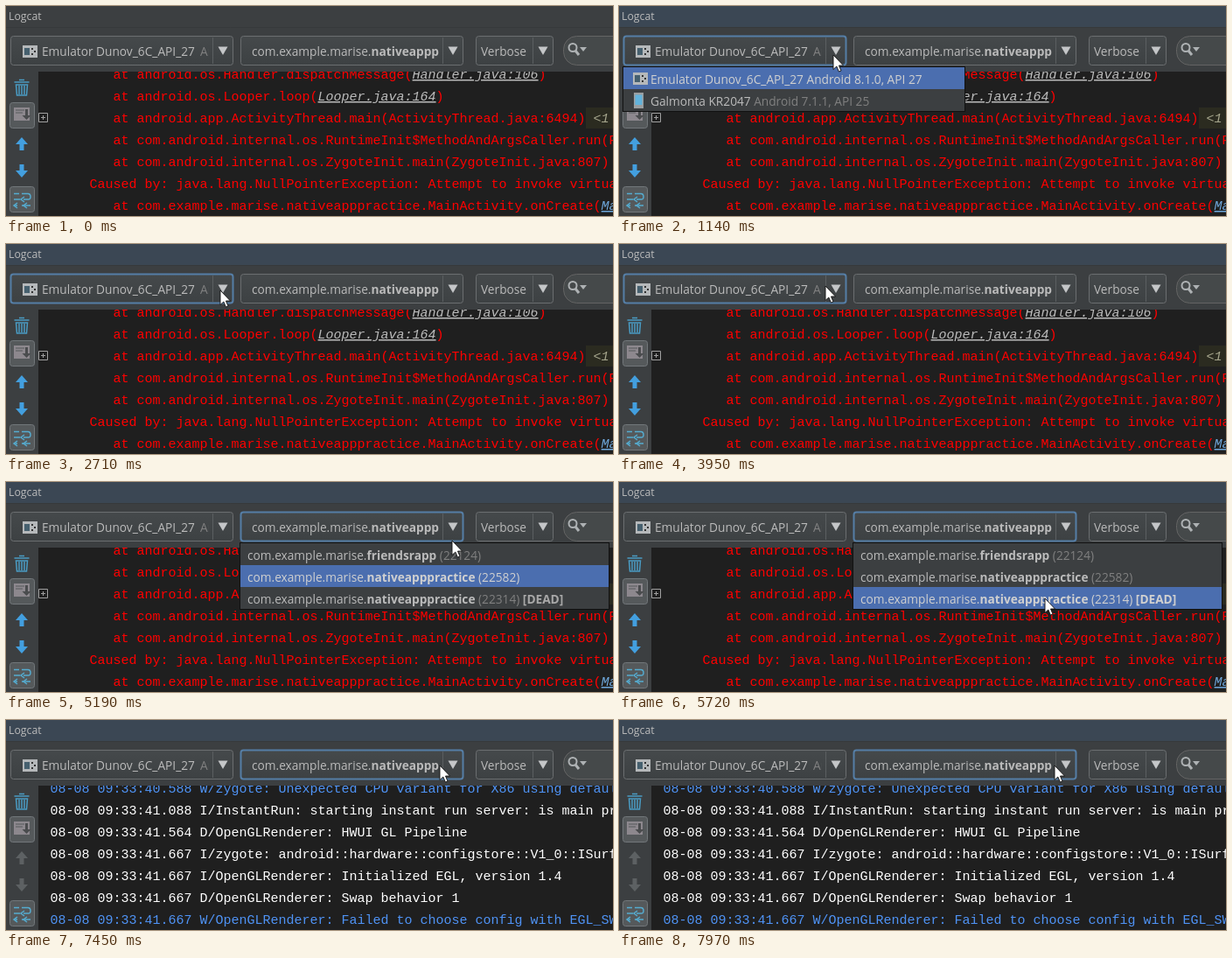
An HTML page that plays this animation: 694x240 px, repeating every 8 s.

```html
<!DOCTYPE html>
<html lang="en">
<head>
<meta charset="utf-8">
<title>Logcat</title>
<style>
  html, body { margin: 0; width: 100%; height: 100%; overflow: hidden; background: #3c3f41; }
  svg { display: block; }
  text { font: 13.7px "Open Sans", "Noto Sans", sans-serif; fill: #bbb; white-space: pre; }
  .title { font-size: 12.3px; }
  .b { font-weight: 700; }
  .dim { fill: #808080; }
  .dead { fill: #a8a8a8; font-weight: 700; }
  .on text, .on tspan { fill: #d0d0d0; }
  .log text { font: 15px "Liberation Mono", "Courier New", monospace; fill: #fff; }
  .log .error { fill: #f00; }
  .log .warn { fill: #4f93f5; }
  .log .link { fill: #bbb; font-style: italic; text-decoration: underline; }
  .log .own { fill: #6fa8dc; }
  .log .fold { fill: #a5a58c; font-style: italic; }
</style>
</head>
<body>
<svg id="stage" width="694" height="240" viewBox="0 0 694 240">
  <defs>
    <linearGradient id="face" x2="0" y2="1">
      <stop stop-color="#45494b"/><stop offset="1" stop-color="#3d4143"/>
    </linearGradient>
  </defs>

  <rect width="694" height="240" fill="#3c3f41"/>
  <rect id="header" width="694" height="24"/>
  <path d="M0 24.5H694" stroke="#36393b"/>
  <text class="title" x="3" y="16">Logcat</text>

  <!-- log area -->
  <rect x="37" y="75" width="657" height="165" fill="#1f1f1f"/>
  <svg y="75" width="694" height="165" viewBox="0 75 694 165">
    <g id="crash" class="log"></g>
    <g id="boot" class="log"></g>
  </svg>

  <!-- side buttons -->
  <g fill="#55595b" stroke="#72777a">
    <rect x="4.5" y="110.5" width="28" height="29" rx="3"/>
    <rect x="4.5" y="206.5" width="28" height="29" rx="3"/>
  </g>
  <g fill="none" stroke="#4a9cc4" stroke-width="1.5">
    <path d="M9.500 87H26.500M15 84.500H21M11.500 90L12.500 102H23.500L24.500 90Z"/>
    <path d="M15 91V101M18 91V101M21 91V101"/>
  </g>
  <path d="M9 116H27V131H9Z" fill="#8d888e"/>
  <path d="M11 119H21M11 122H19" stroke="#55595b"/>
  <path d="M22 118H25V125H28.500L23.500 130L18.500 125H22Z" fill="#4a4c4e"/>
  <g id="arrows">
    <path d="M18 150L25 158H20.500V165H15.500V158H11Z"/>
    <path d="M18 196L25 188H20.500V181H15.500V188H11Z"/>
  </g>
  <g fill="none" stroke="#55acd0" stroke-width="1.5">
    <path d="M9 214.500H15M18 214.500H25Q28 214.500 28 218T25 221H20M16 221H9M9 228H13M18 228H28"/>
    <path d="M21 218L17 221L21 224M13 225L9 228L13 231M24 225L20 228L24 231"/>
  </g>

  <!-- toolbar -->
  <g id="combos"></g>
  <g id="device">
    <path d="M19 45H36V59H19Z" fill="#b5b8ba"/>
    <path d="M21 48H27V56H21Z" fill="#46606f"/>
    <path d="M29 48H31V50H29ZM32 51H34V53H32ZM29 54H31V56H29Z" fill="#333"/>
  </g>
  <svg width="232" height="74">
    <text x="41" y="56.500">Emulator Dunov_6C_API_27</text>
    <text class="dim" x="222" y="56.500">Android</text>
  </svg>
  <text x="281" y="56.500">com.example.marise.<tspan class="b">nativeappp</tspan></text>
  <text x="543" y="56.500">Verbose</text>
  <rect x="637.5" y="34.500" width="90" height="33" rx="15" fill="#45494a" stroke="#646464"/>
  <g fill="none" stroke="#aeb2b4" stroke-width="2">
    <circle cx="648" cy="47.500" r="4.500"/><path d="M651 51L655 56" stroke-width="3"/>
    <path d="M656 47H664L660 52Z" fill="#aeb2b4" stroke="none"/>
  </g>

  <g id="devices"></g>
  <g id="processes"></g>
  <path id="cursor" d="M0 0V16.500L3.800 13L6.400 19L9 18L6.500 12H11.500Z" fill="#fff" stroke="#111" stroke-width=".9"/>
</svg>
<script>
const $ = id => document.getElementById(id);
const ROW = 25;
const text = (x, y, s, cls = '') => `<text x="${x}" y="${y}" class="${cls}">${s}</text>`;
const span = (s, cls) => `<tspan class="${cls}">${s}</tspan>`;
const show = (id, on) => $(id).setAttribute('visibility', on ? 'visible' : 'hidden');
const logLine = (indent, row, s, cls) => text(50.5 + 9 * indent, 83 + ROW * row, s, cls);

// Stack trace: a bracketed part marked with * is a link.
const trace = [
  'at android.os.Handler.dispatchMessage(*Handler.java:106*)',
  'at android.os.Looper.loop(*Looper.java:164*)',
  'at android.app.ActivityThread.main(ActivityThread.java:6494)',
  'at com.android.internal.os.RuntimeInit$MethodAndArgsCaller.run(RuntimeInit.java:438)',
  'at com.android.internal.os.ZygoteInit.main(ZygoteInit.java:807)',
  'Caused by: java.lang.NullPointerException: Attempt to invoke virtual method',
  'at com.example.marise.nativeapppractice.MainActivity.onCreate(*MainActivity.java:24*)'
];
$('crash').innerHTML = trace.map((s, i) => {
  const link = s.includes('marise') ? 'link own' : 'link';
  return logLine(s.startsWith('at') ? 8 : 5, i, s.replace(/\*(.+)\*/, (_, file) => span(file, link)), 'error');
}).join('') +
  '<rect x="663" y="116" width="31" height="24" fill="#2b2b20"/>' +
  logLine(69, 2, '&lt;1 internal', 'fold') +
  '<path d="M37.500 122.500h10v10h-10ZM40 127.500h5M42.500 125v5" fill="#1f1f1f" stroke="#a0a0a0"/>';

const boot = [
  '40.588 W/zygote: Unexpected CPU variant for X86 using defaults: x86',
  '41.088 I/InstantRun: starting instant run server: is main process',
  '41.564 D/OpenGLRenderer: HWUI GL Pipeline',
  '41.667 I/zygote: android::hardware::configstore::V1_0::ISurfaceFlingerConfigs',
  '41.667 I/OpenGLRenderer: Initialized EGL, version 1.4',
  '41.667 D/OpenGLRenderer: Swap behavior 1',
  '41.667 W/OpenGLRenderer: Failed to choose config with EGL_SWAP_BEHAVIOR'
];
$('boot').innerHTML = boot.map((s, i) =>
  logLine(0, i, '08-08 09:33:' + s, s.includes(' W/') ? 'warn' : '')).join('');

const combo = (x, w) => `<g>
  <rect x="${x + .5}" y="34.5" width="${w - 1}" height="33" rx="3" fill="url(#face)"/>
  <path d="M${x + w - 23.5} 36v30" stroke="#5b5f61"/>
  <path d="M${x + w - 17.5} 46.500h11l-5.500 9.500Z" fill="#c4c6c8"/></g>`;
$('combos').innerHTML = combo(5, 255) + combo(268, 255) + combo(537, 89);
const boxes = [...$('combos').children].map(g => g.firstElementChild);

// A popup list; each row is a highlight bar followed by its content.
const popup = (x, w, rows) =>
  `<rect x="${x + .5}" y="69.5" width="${w - 1}" height="${rows.length * ROW + 1}" fill="#3c3f41" stroke="#111"/>` +
  rows.map((content, i) => `<g class="row" transform="translate(${x} ${70 + ROW * i})">
    <rect x="1" width="${w - 2}" height="${ROW}" fill="#4b6eaf"/>${content}</g>`).join('');

const phone = '<path d="M13 4h11v18h-11Z" fill="#9a9ea0"/><path d="M14.500 6.500h8v11.500h-8Z" fill="#62b3dc"/>';
$('devices').innerHTML = popup(4, 392, [
  '<use href="#device" x="-7" y="-39"/>' + text(32, 19, 'Emulator Dunov_6C_API_27 ' + span('Android 8.1.0, API 27', 'dim')),
  phone + text(32, 19, 'Galmonta KR2047 ' + span('Android 7.1.1, API 25', 'dim'))
]);
const app = (name, pid, state = '') =>
  text(9, 19, 'com.example.marise.' + span(name, 'b') + span(` (${pid}) `, 'dim') + span(state, 'dead'));
$('processes').innerHTML = popup(267, 423, [
  app('friendsrapp', 22124),
  app('nativeapppractice', 22582),
  app('nativeapppractice', 22314, '[DEAD]')
]);

function highlight(id, row) {
  $(id).querySelectorAll('.row').forEach((g, i) => {
    g.classList.toggle('on', i == row);
    g.firstElementChild.setAttribute('opacity', i == row ? 1 : 0);
  });
}

// Pointer moves: each is a curve from the last resting place; without bends it eases straight there.
const home = [320, 135];
const moves = [
  { from: 70, until: 510, to: [256, 52] },
  { from: 830, until: 1220, to: [244, 57] },
  { from: 1690, until: 1830, to: [227, 107] },
  { from: 2000, until: 2710, to: [245, 53] },
  { from: 2860, until: 3640, to: [521, 60], bends: [[0, 100], [909, 10]] },
  { from: 3720, until: 4500, to: [508, 53], bends: [[30, 50], [160, 21]] },
  { from: 4960, until: 5720, to: [487, 133], bends: [[512, 60], [512, 99]] },
  { from: 6040, until: 6590, to: [508, 54] },
  { from: 6740, until: 7450, to: [496, 52], bends: [[635, 52], [635, 52]] },
  { from: 7600, until: 7970, to: [498, 52] }
];

const STEP = 75, SLACK = 6;
function pointer(t) {
  let spot = home;
  for (const { from, until, to, bends = [spot, to] } of moves) {
    if (t < from) break;
    const n = Math.round((until - from) / STEP);
    const k = Math.min(1, Math.floor((t - from + SLACK) / (until - from) * n) / n), r = 1 - k;
    spot = spot.map((a, i) => Math.round(
      r ** 3 * a + 3 * r * r * k * bends[0][i] + 3 * r * k * k * bends[1][i] + k ** 3 * to[i]));
  }
  return spot;
}

const LOOP = 8000, ENTER = 70, OPEN = 1060, CLOSE = 2700, SWITCH = 4560, PICK = 6040,
  RELOAD = 6110, REOPEN = 7600, RECLOSE = 7895;

function draw(t) {
  const [x, y] = pointer(t);
  const hovered = resting => y < 70 ? resting : Math.floor((y - 70) / ROW);
  const focused = t < OPEN ? -1 : t < SWITCH ? 0 : 1;
  boxes.forEach((box, i) => {
    box.setAttribute('stroke', i == focused ? '#557ea6' : '#6b6e70');
    box.setAttribute('stroke-width', i == focused ? 2 : 1);
  });
  $('cursor').setAttribute('transform', `translate(${x} ${y})`);
  show('cursor', t >= ENTER);
  $('header').setAttribute('fill', t < OPEN ? '#3c3f41' : '#3b4754');
  show('devices', t >= OPEN && t < CLOSE);
  show('processes', t >= SWITCH && t < PICK || t >= REOPEN && t < RECLOSE);
  highlight('devices', hovered(0));
  highlight('processes', hovered(t < PICK ? 1 : 2));
  show('crash', t < RELOAD);
  show('boot', t >= RELOAD);
  $('arrows').setAttribute('fill', t < RELOAD ? '#439fdf' : '#5d6163');
}

const start = performance.now();
function tick() {
  draw((performance.now() - start) % LOOP);
  requestAnimationFrame(tick);
}
tick();
</script>
</body>
</html>
```
